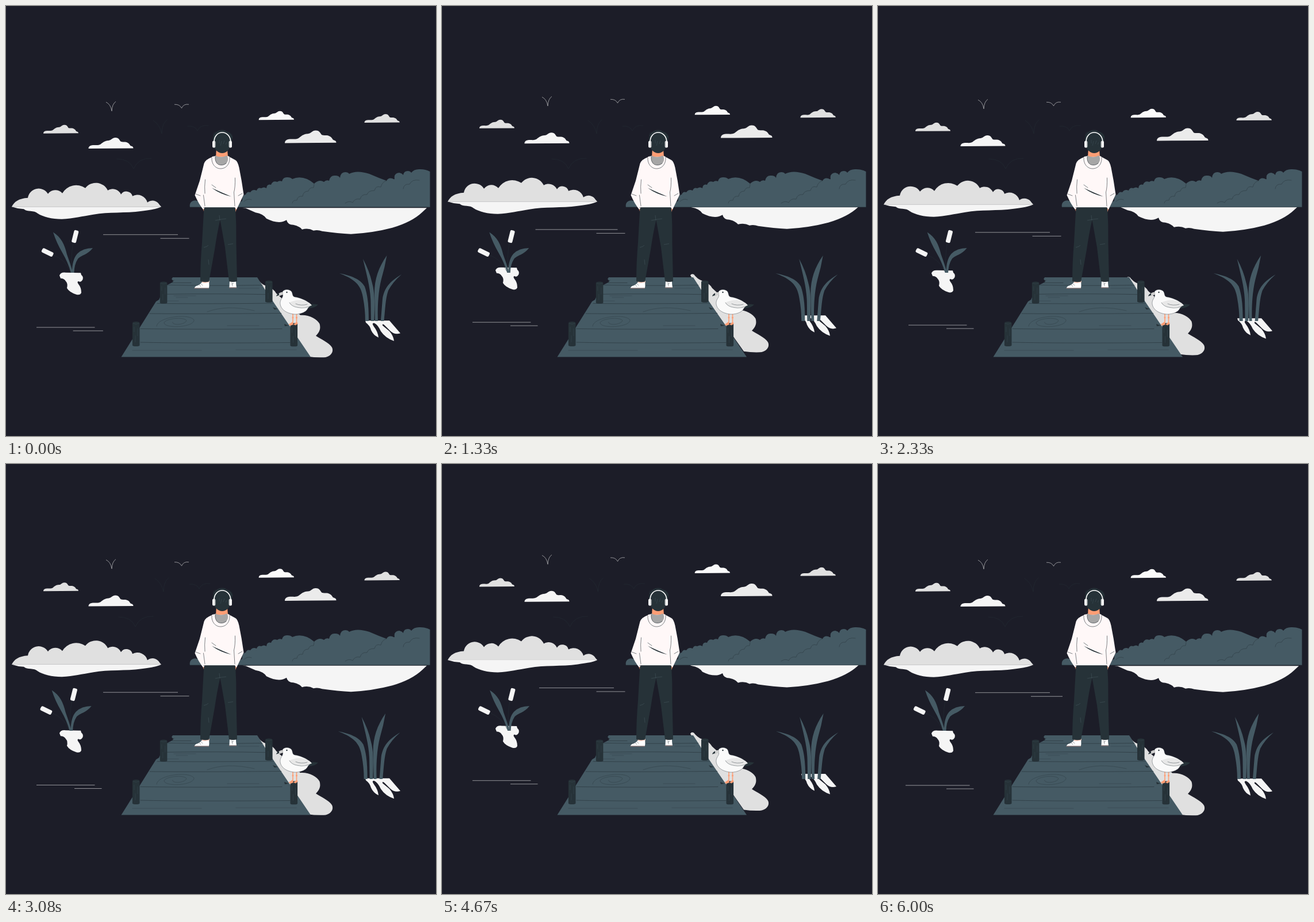
An HTML page for the animation above (6040 ms loop, 748 px wide and 748 px high).

```html
<!DOCTYPE html>
<html lang="en">
<head>
<meta charset="utf-8">
<title>Quiet pier</title>
<style>
  html, body { margin: 0; width: 100%; height: 100%; overflow: hidden; background: #1c1d28; }
  svg { display: block; width: 100vw; height: 100vh; }
  .slate { fill: #455a64; }
  .ink { fill: #263238; }
  .pale { fill: #f5f5f5; }
  .grey { fill: #e0e0e0; }
  .skin { fill: #ff9e75; }
  .line { fill: none; stroke: #263238; stroke-width: .6; stroke-linecap: round; }
  .fine { fill: none; stroke: #263238; stroke-width: .45; stroke-linecap: round; }
  .wave { stroke: #c4c4c8; stroke-width: .7; }
  .bird { fill: none; stroke: #e0e0e0; stroke-width: .6; }
</style>
</head>
<body>
<svg viewBox="0 0 748 748" xmlns="http://www.w3.org/2000/svg">
  <defs>
    <path id="cloud" d="M0 25C0 19 5 17 13 17C18 17 22 18 27 15C32 11 36 7 45 6.500C51 6 53 0 60 0C68 0 69 6 72 9C77 11 82 8 88 12C93 15 92 18 95 19C98 20 100 21 100 24.300Z"/>
    <g id="post">
      <path class="ink" d="M0 3Q0 0 6.300 0Q12.600 0 12.600 3V41Q12.600 43 6.300 43Q0 43 0 41Z"/>
      <path d="M1 3Q6.300 5.500 11.600 3M3 9V18M9 12V25M5 24V36" fill="none" stroke="#3a4a53" stroke-width=".5"/>
    </g>
  </defs>

  <g id="float">
    <use href="#cloud" class="grey" transform="translate(65 207) scale(.61 .6)"/>
    <use href="#cloud" class="pale" transform="translate(143.500 229.300) scale(.78 .76)"/>
    <use href="#cloud" fill="#fafafa" transform="translate(439.700 183) scale(.613 .62)"/>
    <use href="#cloud" fill="#ebebeb" transform="translate(485 216.700) scale(.895 .88)"/>
    <use href="#cloud" class="grey" transform="translate(623.500 188.300) scale(.613 .6)"/>

    <path class="bird" d="M174 167.500Q182 171 184 183Q184.500 171 191 166.500M293 171.500Q302 171 305.500 178Q309 170 318 171.500"/>

    <path class="grey" d="M10 349.500C14 341 22 335 38 334A19 19 0 0 1 73 327A16 16 0 0 1 98 326A28 28 0 0 1 138 317A23 23 0 0 1 177 321A16 16 0 0 1 200 328A11 11 0 0 1 220 331A18 18 0 0 1 246 342A14 14 0 0 1 267 346L270 349.500Z"/>
    <path class="pale" d="M10 349.500Q20 353 31 353.500C37 359 49 355 55 361C64 367 80 371 97 371C118 370 132 366 152 363C178 358 208 361 236 357Q262 354 270 349.500Z"/>
    <path d="M10 349.300H270" stroke="#cfcfcf" stroke-width=".5"/>

    <path class="pale" d="M411 351.500L417 352L434 359.500Q448 362 453 370Q475 381 488 372.500Q490 381 500 381Q510 383 515 389Q526 386 535 391Q542 389 550 392Q578 396 600 397Q638 395 672 386Q706 376 724 359L732 351.500Z"/>

    <path class="pale" d="M93 469Q95 463 104 464L130 464.500L131 468Q135 471 133.500 476Q130 482 126 479Q123 480 126 484Q131 490 131 499Q129 504 122 502Q110 498 106 491Q108 483 104 479Q101 474 95 474Z"/>
    <path class="pale" d="M625 547.500H667L686 569.500Q676 573 668 565L660 557Q654 551 655 556L667 566Q674 574 675 583Q660 578 652 566Q647 555 641 552Q635 551 640 558Q647 567 648 577Q639 573 635 564Q633 556 626 551Z"/>

    <path class="grey" d="M432 478Q433 474 438 476Q444 484 452 487Q465 491 470 500L512 538C528 537 541 545 545.500 553C548 562 545 568 539 574C548 580 562 586 567 594C571 602 564 611 553 611.500Q538 612 525 610Z"/>

    <g class="wave" id="waves">
      <path d="M169 398H299"/>
      <path d="M268.500 404.500H318.500"/>
      <path d="M53 559.300H154.500"/>
      <path d="M119 565.300H166.500"/>
    </g>
  </g>

  <g id="flock" class="fine">
    <path d="M256 199Q268 207 271 222Q271 205 280 198M316 209Q329 208 333 217Q338 206 352 208M193 266Q215 266 222 283Q230 264 253 265"/>
  </g>

  <g>
    <path class="slate" d="M320 350C318 341 326 336 333 339L405 346Q407 340 411 339Q410 329 417 328Q419 322 425 324Q429 318 436 321Q438 315 444 317Q449 314 453 317Q454 309 461 311Q464 303 472 306Q475 303 480 305Q482 297 490 298Q495 298 498 301Q517 293 536 309Q545 301 553 306Q557 302 562 304Q564 294 573 295Q579 295 581 299Q582 289 590 289Q595 289 597 292Q610 285 632 292Q648 299 662 304Q665 298 672 300Q675 302 676 301Q674 291 684 290Q689 291 691 294Q692 287 699 287Q703 287 705 290Q710 283 721 284Q730 284 737.500 288V350Z"/>
    <path class="fine" d="M498 343Q499 337 506 338Q507 330 516 331Q517 322 526 322Q528 315 535 316Q536 311 536 309M590 343Q597 338 603 342Q607 334 616 336Q618 327 628 328Q630 321 641 321Q643 312 652 315Q654 306 662 304M691 318Q692 309 702 310Q706 301 719 303M414 340Q420 334 427 337"/>
    <path class="line" d="M320 349.800H737.500"/>
  </g>

  <g id="reeds">
    <g>
      <path class="fine" d="M117 411Q112 440 115 462M82 433Q103 441 112 461"/>
      <rect class="pale" x="-4" y="-11" width="8" height="22" rx="2.500" transform="translate(120.300 401) rotate(14)"/>
      <rect class="pale" x="-4" y="-10.500" width="8" height="21" rx="2.500" transform="translate(72.300 428.600) rotate(-64)"/>
      <path class="slate" d="M82 393.500C96 402 102 415 106 432Q112 448 116.500 464H113Q108 446 98 429Q88 412 82 393.500Z"/>
      <path class="slate" d="M151 421C142 433 131 433 125 440Q119 449 118.500 464H115C115 448 118 438 124 431Q134 421 151 421Z"/>
    </g>
    <g class="slate">
      <path d="M580 465C601 473 616 482 620 502Q625 525 625 548H631C631 525 630 505 624 488C617 475 600 469 580 465Z"/>
      <path d="M621 440C628 470 634 490 634.500 515L635 548H640.500C641.500 520 642 500 637 482Q632 460 621 440Z"/>
      <path d="M662.500 434C648 455 641 475 641 500L642 548H647C646 520 648 495 653 475Q659 455 662.500 434Z"/>
      <path d="M688 467C668 479 658 490 655 510L652 548H657.500C660 525 660 510 665 495Q673 480 688 467Z"/>
    </g>
  </g>

  <g>
    <path class="slate" d="M290 472H437L446 486L451 494L530 610.500H200.500L261 514L266 511L277 487L289 481L291 478L288 475Z"/>
    <path class="line" d="M292 477L289 481.500H322M280 485.300Q360 487 446 485.600M279 501.300Q370 500 455 501.800M263 517.400Q340 518.500 465 517M250 535Q330 536 479 534.500M234 561.500Q360 563 480 561.500M234 585Q320 587 494 585.500"/>
    <path class="fine" opacity=".75" d="M292 504H330M296 507H316M405 491H440M280 513H300M350 532Q384 519 432 530M262 557C263 541 318 534 327 546C328 559 276 562 275 551C277 544 308 540 314 547C312 555 288 556 290 550M385 556H440M220 599H340M400 598H505"/>
    <path class="ink" d="M464 524L473 527L467 528ZM484 553L492 556L485 557Z"/>
    <use href="#post" transform="translate(267.800 479.500) scale(1 .89)"/>
    <use href="#post" transform="translate(451 477.500) scale(1 .89)"/>
    <use href="#post" transform="translate(219.900 549)"/>
    <use href="#post" transform="translate(494.500 551.500) scale(1 .95)"/>
  </g>

  <g>
    <path d="M499 534V552M505.500 534V552" stroke="#ff9e75" stroke-width="1.600"/>
    <path class="skin" d="M498 549.500L491.500 554L495 556L500 554ZM505.500 549.500L500 554L504 555.500L508 552Z"/>
    <circle class="skin" cx="499" cy="542" r="1.500"/>
    <circle class="skin" cx="505.500" cy="542" r="1.500"/>
    <path class="ink" d="M526 519.500Q534 517.500 543 519.500Q538 525 526 526Z"/>
    <path d="M481 497C484 492 493 492 497 497C499 501 498 505 502 506C515 508 526 514 531 520Q525 525 524 528C519 535 505 538 495 535C483 532 476 524 477 515C478 509 482 507 481.500 503Z" fill="#fafafa" stroke="#263238" stroke-width=".4"/>
    <path fill="#e8e8e8" d="M493 516Q507 509 520 513Q529 516 532 521Q520 526 507 524Q496 522 493 516Z"/>
    <path class="fine" d="M493 516Q497 523 508 524.500Q520 527 532 521M504 518Q513 522 524 519"/>
    <path d="M481.500 497.500Q475 498 471 503.500L474 505L482 502Z" fill="#cfcfcf"/>
    <path class="ink" d="M475 499.500Q471 501 470 505L475 503Z"/>
    <circle class="ink" cx="488.500" cy="498" r="1.200"/>
  </g>

  <g>
    <path d="M341 478H354L353 484H340ZM389 477H400V483H389Z" fill="#f3c9bb"/>
    <path d="M340.500 481Q346 483 353 480.500Q354 486 353 490.500H328Q328.500 487 334 486Q338 484 340.500 481ZM389 479Q395 481 400 478.500Q400 484 401 489.500H388.500Z" fill="#fff"/>
    <path d="M327.500 491H353M388 490H401" stroke="#a87d78" stroke-width=".8"/>
    <path class="fine" d="M339 483L342 486M336 485L339 488M393 481L394 487M396 482L393 484"/>
    <path class="skin" d="M342 350L344.500 359L347 351ZM398 350L398.500 360L402 351Z"/>
    <path class="ink" d="M344.500 349H399Q401 380 400.500 412L402 479Q395 481 388 479L381 420L372.500 372Q367 396 363 424L353 479.500Q345 481 338 479Q338 446 341 411Z"/>
    <path d="M364 373Q373 371 383 370M371 364L372 373M386 415L395 413.500M344 420Q350 419 352 416M352 441L353 450" fill="none" stroke="#43545c" stroke-width=".6"/>

    <path class="skin" d="M366 248H385L386 263Q376 270 365 263Z"/>
    <path d="M358 263Q347 267 344.500 274Q341 288 337 304L328.500 329Q335 344 343 354L346 350.500H398L401 354Q408 340 413.500 328Q410 303 405.500 281Q403 270 399 268L388 262Z" fill="#fff8f8"/>
    <path class="line" d="M346.500 302Q345 315 346 326M398.500 299Q399 315 396.500 324L398 348M343.500 329L346 348M330 327L338 330M404 330L411 326M358 311L365 316M344 350.500H398"/>
    <path d="M358 316.500Q374 324 392 331.500Q373 327.500 358 316.500Z" class="ink"/>
    <path d="M364 260Q361 270 367 275Q376 280 384 274Q389 267 384 260Q374 265 364 260Z" fill="#a6a6a6"/>
    <path d="M358.500 262C356 272 363 283 374 282.500C385 282 390 271 388.500 262L385.500 260.500Q388 270 382 275Q374 279.500 367 274Q363 269 364 261Z" fill="#fff8f8"/>
    <path class="line" d="M358 264C357 274 364 283.500 374 283C385 282.500 390 272 389 263M364 262Q363 271 369 275.500Q377 279 383 273.500"/>

    <path class="ink" d="M360 236Q359 223 366 219Q376 213 385 219Q390 219 394 228Q392 241 388 249Q383 256 376 256Q369 256 364 249Q360 243 360 236Z"/>
    <path class="line" d="M362 228Q358 221 365 219M368 218Q374 214 382 217M386 220Q394 221 394 229"/>
    <path d="M371 233V239M375 235L373 243M380 234L378 240M384 237L382 241" stroke="#40515a" stroke-width=".5"/>
    <path d="M362 238C361 214 391 214 391 238" fill="none" stroke="#fff" stroke-width="1.700"/>
    <rect class="pale" x="359" y="234.500" width="5.500" height="12" rx="2.500"/>
    <rect class="pale" x="387.500" y="234.500" width="5.500" height="12" rx="2.500"/>
    <path class="line" d="M364 235V246M388 235V246"/>
  </g>
</svg>
<script>
  const LOOP = 6040, CYCLE = 6000, LEAD = 40;
  const byId = id => document.getElementById(id);
  const float = byId('float'), reeds = byId('reeds'), flock = byId('flock');
  const waves = [...byId('waves').children];

  // [time, value] tables with straight runs between entries
  const sway = [0, -1, 2, -4, 4, -4, 4, -4, 2, -1, 0].map((x, i) => [i * CYCLE / 10, x]);
  const drift = [[0, 0], [1330, -2], [2330, 0], [3080, 3], [4000, 1], [5380, 0], [6000, -1], [LOOP, 0]];
  const pulses = [
    [[1180, 1], [1330, 1.1], [1480, 1]],
    [[5880, 1], [6000, 1.1], [LOOP, 1.1]],
    [[5880, 1], [6000, 1.1], [LOOP, 1.1]],
    [[0, 1.1], [120, 1]]
  ];
  const centres = [234, 293.5, 103.75, 142.75];

  function sample(table, t) {
    const next = table.findIndex(([at]) => at > t);
    if (next === 0) return table[0][1];
    if (next < 0) return table[table.length - 1][1];
    const [t0, a] = table[next - 1], [t1, b] = table[next];
    return a + (b - a) * (t - t0) / (t1 - t0);
  }

  const move = (node, x, y) => node.setAttribute('transform', `translate(${x} ${y})`);

  function draw(now) {
    const t = now % LOOP;
    const phase = (t + LEAD) % CYCLE;
    const lift = 10 * (1 - Math.abs((phase % 3000) / 1500 - 1));
    move(float, 0, -lift);
    move(reeds, sample(sway, phase), 0);
    move(flock, sample(drift, t), 0);
    waves.forEach((wave, i) => {
      const k = sample(pulses[i], t), c = centres[i];
      wave.setAttribute('transform', `translate(${c * (1 - k)} 0) scale(${k} 1)`);
    });
  }

  const start = performance.now();
  function tick() {
    draw(performance.now() - start);
    requestAnimationFrame(tick);
  }
  tick();
</script>
</body>
</html>
```
